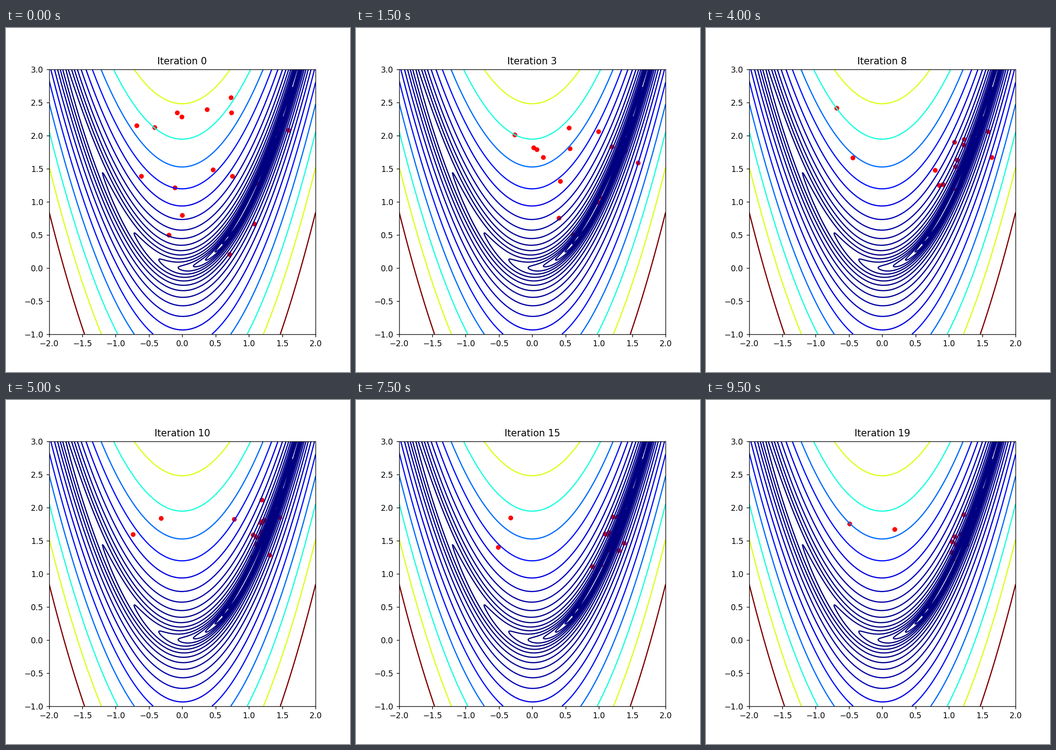
Recreate the animation shown at these times as a matplotlib script. Size 748 by 748 pixels, loop 10 s.

```python
import numpy as np
import matplotlib.pyplot as plt
from matplotlib.animation import FuncAnimation

STEPS = 20
SEEKERS, STRAGGLERS = 15, 2
LOWER, UPPER = np.array([-2, -1]), np.array([2, 3])
BEST = np.array([1.26, 1.6])
HOME = np.array([-0.45, 1.8])

START = np.random.default_rng(7).uniform([-0.7, 0.1], [1.6, 2.6], (SEEKERS, 2))


def rosenbrock(x, y):
    return (1 - x) ** 2 + 100 * (y - x ** 2) ** 2


def swarm(step):
    """Seekers close in on the valley while a few stragglers keep roaming."""
    rng = np.random.default_rng(100 + step)
    pull = 1 - np.exp(-step / 5)
    wander = 0.3 * np.exp(-step / 7) * min(step, 1)
    along_valley = pull * rng.normal(0, 0.09, (SEEKERS, 1)) * [1, 2 * BEST[0]]
    seekers = START + pull * (BEST - START) + along_valley
    seekers += rng.normal(0, wander + 0.06 * pull, (SEEKERS, 2))
    stragglers = HOME + rng.normal(0, 0.3, (STRAGGLERS, 2))
    return np.clip(np.vstack([seekers, stragglers]), LOWER, UPPER)


fig, ax = plt.subplots(figsize=(6, 6), dpi=748 / 6)
X, Y = np.meshgrid(np.linspace(-2, 2, 400), np.linspace(-1, 3, 400))
ax.contour(X, Y, rosenbrock(X, Y), levels=np.logspace(-1, 3, 20), cmap="jet")
particles = ax.scatter(*swarm(0).T, s=36, color="red", linewidths=0, zorder=1)
ax.set(xlim=(-2, 2), ylim=(-1, 3))
title = ax.set_title("Iteration 0")


def update(step):
    particles.set_offsets(swarm(step))
    title.set_text(f"Iteration {step}")
    return particles, title


anim = FuncAnimation(fig, update, frames=STEPS, interval=500, repeat=True,
                     repeat_delay=0)
plt.show()
```
